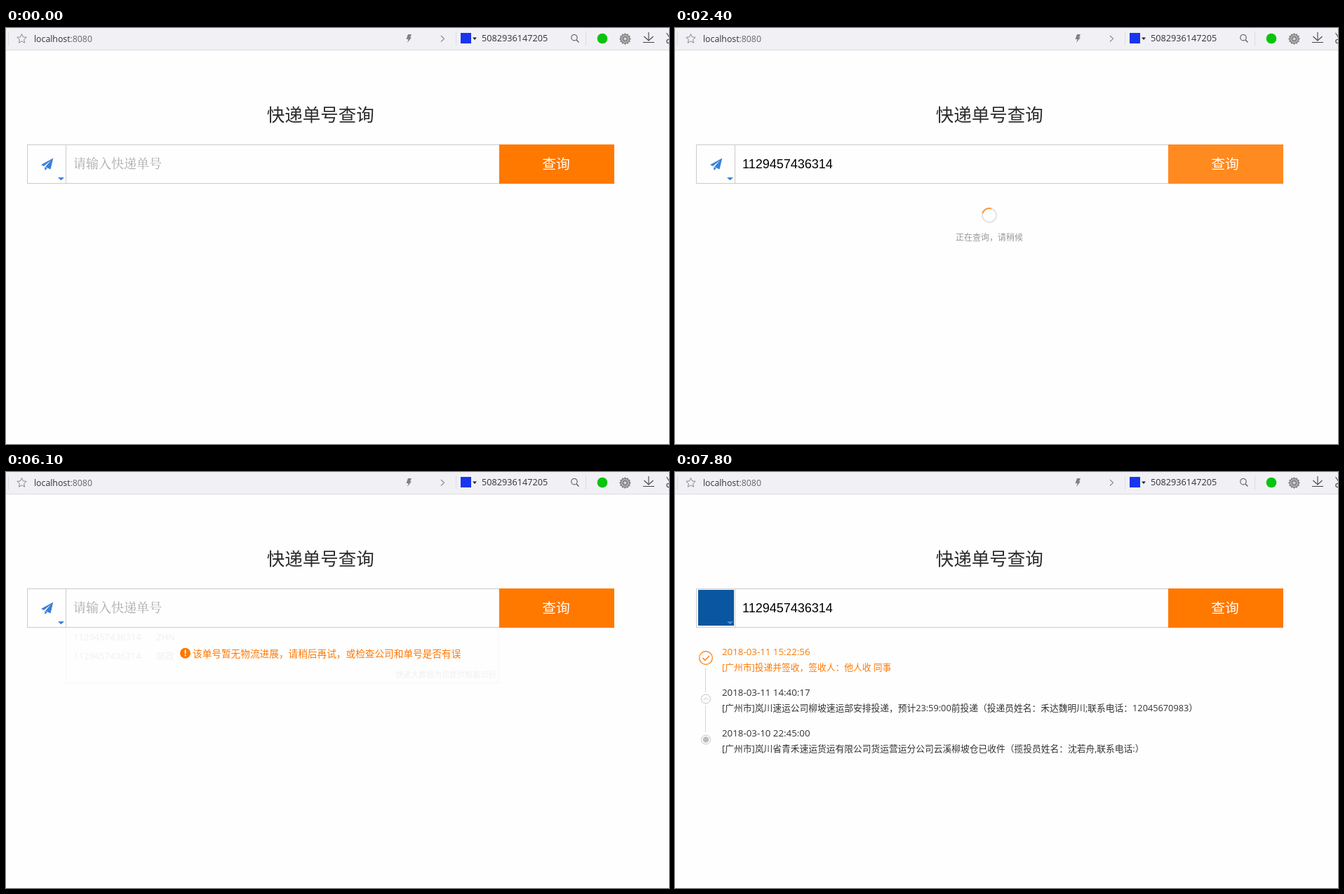
An HTML page with a canvas that plays this animation: 945 px wide and 593 px high, repeating every 8 s.

```html
<!DOCTYPE html>
<html lang="zh-CN">
<head>
<meta charset="utf-8">
<title>快递单号查询</title>
<style>
html, body { margin: 0; width: 100%; height: 100%; overflow: hidden; background: #fefefe; }
canvas { display: block; width: 945px; height: 593px; }
</style>
</head>
<body>
<canvas id="stage" width="945" height="593"></canvas>
<script>
const ctx = document.getElementById('stage').getContext('2d');
const LOOP = 8000;
const SANS = '"Open Sans", "Noto Sans CJK SC", "Noto Sans CJK", sans-serif';
const CJK = '"Noto Sans CJK SC", "Noto Sans CJK", sans-serif';
const ARIAL = '"Liberation Sans", Arial, sans-serif';
const SERIF = '"Noto Serif CJK SC", "Noto Sans CJK SC", "Noto Sans CJK", serif';
const ORANGE = '#ff7800', PAGE = '#fefefe', LINE = '#ccc';
const NUMBER = '1129457436314';
const COURIERS = ['ZHN', '邮政'];

// Caret: [from, to, x]
const CARETS = [
  [500, 700, 95], [700, 1400, 227], [1900, 2400, 227], [5400, 5500, 146],
  [5700, 6100, 95], [6500, 6700, 95], [6700, 7000, 227]
];
const EVENTS = [
  ['2018-03-11 15:22:56', '[广州市]投递并签收，签收人：他人收 同事'],
  ['2018-03-11 14:40:17', '[广州市]岚川速运公司柳坡速运部安排投递，预计23:59:00前投递（投递员姓名：禾达魏明川;联系电话：12045670983）'],
  ['2018-03-10 22:45:00', '[广州市]岚川省青禾速运货运有限公司货运营运分公司云溪柳坡仓已收件（揽投员姓名：沈若舟,联系电话:）']
];

const within = (t, from, to) => t >= from && t < to;

function rect(x, y, w, h, color) {
  ctx.fillStyle = color;
  ctx.fillRect(x, y, w, h);
}

function text(str, x, y, size, color, family = SANS, align = 'left') {
  ctx.font = `${size}px ${family}`;
  ctx.textAlign = align;
  ctx.fillStyle = color;
  ctx.fillText(str, x, y);
}

function trace(points, closed) {
  ctx.beginPath();
  points.forEach(([x, y]) => ctx.lineTo(x, y));
  if (closed) ctx.closePath();
}

function polygon(points, color) {
  trace(points, true);
  ctx.fillStyle = color;
  ctx.fill();
}

function polyline(points, color, width = 1, closed = false) {
  trace(points, closed);
  ctx.strokeStyle = color;
  ctx.lineWidth = width;
  ctx.stroke();
}

function disc(x, y, r, color) {
  ctx.beginPath();
  ctx.arc(x, y, r, 0, Math.PI * 2);
  ctx.fillStyle = color;
  ctx.fill();
}

function ring(x, y, r, color, width = 1, from = 0, sweep = Math.PI * 2) {
  ctx.beginPath();
  ctx.arc(x, y, r, from, from + sweep);
  ctx.strokeStyle = color;
  ctx.lineWidth = width;
  ctx.stroke();
}

// Points alternating between two radii: stars and cogs.
function spikes(x, y, outer, inner, count) {
  return Array.from({ length: count * 2 }, (_, i) => {
    const a = -Math.PI / 2 + i * Math.PI / count, r = i % 2 ? inner : outer;
    return [x + r * Math.cos(a), y + r * Math.sin(a)];
  });
}

function drawToolbar() {
  rect(0, 0, 945, 31, '#f1f1f5');
  rect(0, 31, 945, 1, '#dcdce0');
  [3, 641, 826].forEach(x => rect(x, 5, 1, 20, '#dddde1'));

  polyline(spikes(22.5, 15.5, 7, 3.3, 5), '#888', 1, true);
  text('localhost', 40, 20, 12.3, '#333');
  const portX = 40 + ctx.measureText('localhost').width;
  text(':8080', portX, 20, 12.3, '#666');

  polygon([[573, 9], [578, 9], [576, 13.5], [578, 13.5], [572, 21], [573.5, 16], [570.5, 16]], '#808085');
  polyline([[620, 11], [624.5, 15.3], [620, 19.5]], '#888', 1.1);

  rect(648, 7, 15, 15, '#1a35ee');
  polygon([[665, 13.5], [671, 13.5], [668, 17]], '#222');
  text('5082936147205', 678, 19, 12.7, '#333');

  ring(810, 13.7, 4.2, '#555', 1.1);
  polyline([[813, 17], [816.5, 20.5]], '#555', 1.3);

  disc(850, 15, 7.3, '#09c40c');
  polygon(spikes(882.5, 15.5, 8.5, 6.8, 12), '#858585');
  ring(882.5, 15.5, 4.8, '#c4c4c4', 1.2);
  disc(882.5, 15.5, 2, '#d5d5d5');

  polyline([[916, 6], [916, 18]], '#444', 1.1);
  polyline([[909.5, 12], [916, 18], [922.5, 12]], '#444', 1.1);
  rect(908, 20, 16, 1, '#444');
  polyline([[941.5, 7], [946, 14]], '#555', 1.2);
  ring(944.5, 19, 2.7, '#555', 1.2);
}

function drawCourierIcon(chosen) {
  if (chosen) {
    rect(33, 168, 51, 51, '#0b56a0');
  } else {
    const blue = '#3a80d8';
    polygon([[67.3, 185.5], [50, 195], [54, 197], [64, 188.7], [56, 198], [63.5, 201.5]], blue);
    polygon([[55, 198.3], [59, 200], [55.5, 203]], blue);
  }
  polygon([[74, 213], [83, 213], [78.5, 217.3]], chosen ? '#4b8fd0' : '#3a80d8');
}

function drawForm(t) {
  text('快递单号查询', 448.3, 132.5, 25.5, '#2b2b2b', CJK, 'center');
  ctx.strokeStyle = LINE;
  ctx.lineWidth = 1;
  ctx.strokeRect(30.5, 166.5, 673, 55);
  rect(85, 166, 1, 56, LINE);
  drawCourierIcon(t >= 7500);

  rect(703, 166, 164, 56, within(t, 1600, 2500) ? '#ff8a20' : ORANGE);
  text('查询', 784, 201.3, 19.8, '#fff', CJK, 'center');

  const empty = t < 700 || within(t, 5700, 6700);
  const selected = within(t, 5500, 5700);
  if (selected) rect(95, 184, 132, 20, '#3390ff');
  if (empty) text('请输入快递单号', 96, 200, 18, '#a9a9a9', SERIF);
  else text(NUMBER, 96, 200, 18, selected ? '#fff' : '#000', ARIAL);

  const caret = CARETS.find(([from, to]) => within(t, from, to));
  if (caret) rect(caret[2], 184, 1, 20, '#000');
}

function drawRows(colors) {
  COURIERS.forEach((name, i) => {
    const y = 240 + i * 27;
    text(NUMBER, 96, y, 13, colors[i]);
    text(name, 214.3, y, 12.9, colors[i]);
  });
}

function drawFooter(y, color) {
  text('快递大数据为您提供智能识别', 698.3, y, 11, color, CJK, 'right');
}

function drawPanel(bottom, border) {
  rect(85, 222, 618, bottom - 222, PAGE);
  rect(85, 222, 1, bottom - 222, border);
  rect(702, 222, 1, bottom - 222, border);
  rect(85, bottom - 1, 618, 1, border);
}

function drawSuggestions(t) {
  const short = within(t, 1000, 1100) || within(t, 6900, 7000);
  if (short) {
    drawPanel(256, LINE);
    drawFooter(247.5, '#c6c6c6');
    return;
  }
  drawPanel(301, LINE);
  const hovered = within(t, 1300, 1600) || t >= 7300;
  drawRows([hovered ? '#6b6b6b' : '#333', '#333']);
  drawFooter(293, '#c9c9c9');
}

function drawFadedPanel() {
  rect(85, 222, 1, 79, '#f7f7f7');
  rect(702, 222, 1, 79, '#f7f7f7');
  rect(85, 300, 618, 1, '#f6f6f6');
  drawRows(['#f0f0f0', '#f0f0f0']);
  drawFooter(293, '#efefef');
}

function drawMessage() {
  disc(255.5, 258.3, 7.5, ORANGE);
  rect(254.7, 253.5, 1.8, 5.8, '#fff');
  rect(254.7, 260.7, 1.8, 1.8, '#fff');
  text('该单号暂无物流进展，请稍后再试，或检查公司和单号是否有误', 266, 263.7, 13.67, ORANGE, CJK);
}

function drawLoading(t) {
  ring(448, 267, 10, '#e4e4e4', 2);
  ring(448, 267, 10, '#ff9a40', 2, t / 150, Math.PI / 2);
  text('正在查询，请稍候', 448, 303, 12, '#999', CJK, 'center');
}

function drawResults() {
  const grey = '#c4c4c4';
  rect(43, 279, 1, 35, '#d5d5d5');
  rect(43, 333, 1, 38, '#d5d5d5');
  ring(44, 265, 9.3, ORANGE, 1.2);
  polyline([[39.5, 265], [42.8, 268.3], [49, 262]], ORANGE, 1.3);
  ring(44, 323.5, 6.5, grey);
  polyline([[40.8, 325], [44, 321.8], [47.2, 325]], grey);
  ring(44, 381.5, 6.5, grey);
  disc(44, 381.5, 4.3, '#bdbdbd');

  EVENTS.forEach(([date, detail], i) => {
    const y = 261 + i * 58, color = i ? '#333' : ORANGE;
    text(date, 67, y, 13.3, color);
    text(detail, 67, y + 22, 12.75, color);
  });
}

function draw(t) {
  rect(0, 0, 945, 593, PAGE);
  drawToolbar();
  drawForm(t);
  if (within(t, 2600, 7000)) drawMessage();
  if (within(t, 1000, 2400) || within(t, 6900, 7500)) drawSuggestions(t);
  if (within(t, 2600, 7000)) drawFadedPanel();
  if (within(t, 2400, 2600) || within(t, 7500, 7800)) drawLoading(t);
  if (t >= 7800) drawResults();
}

let start;
function tick(now) {
  start ??= now;
  draw((now - start) % LOOP);
  requestAnimationFrame(tick);
}
requestAnimationFrame(tick);
</script>
</body>
</html>
```
